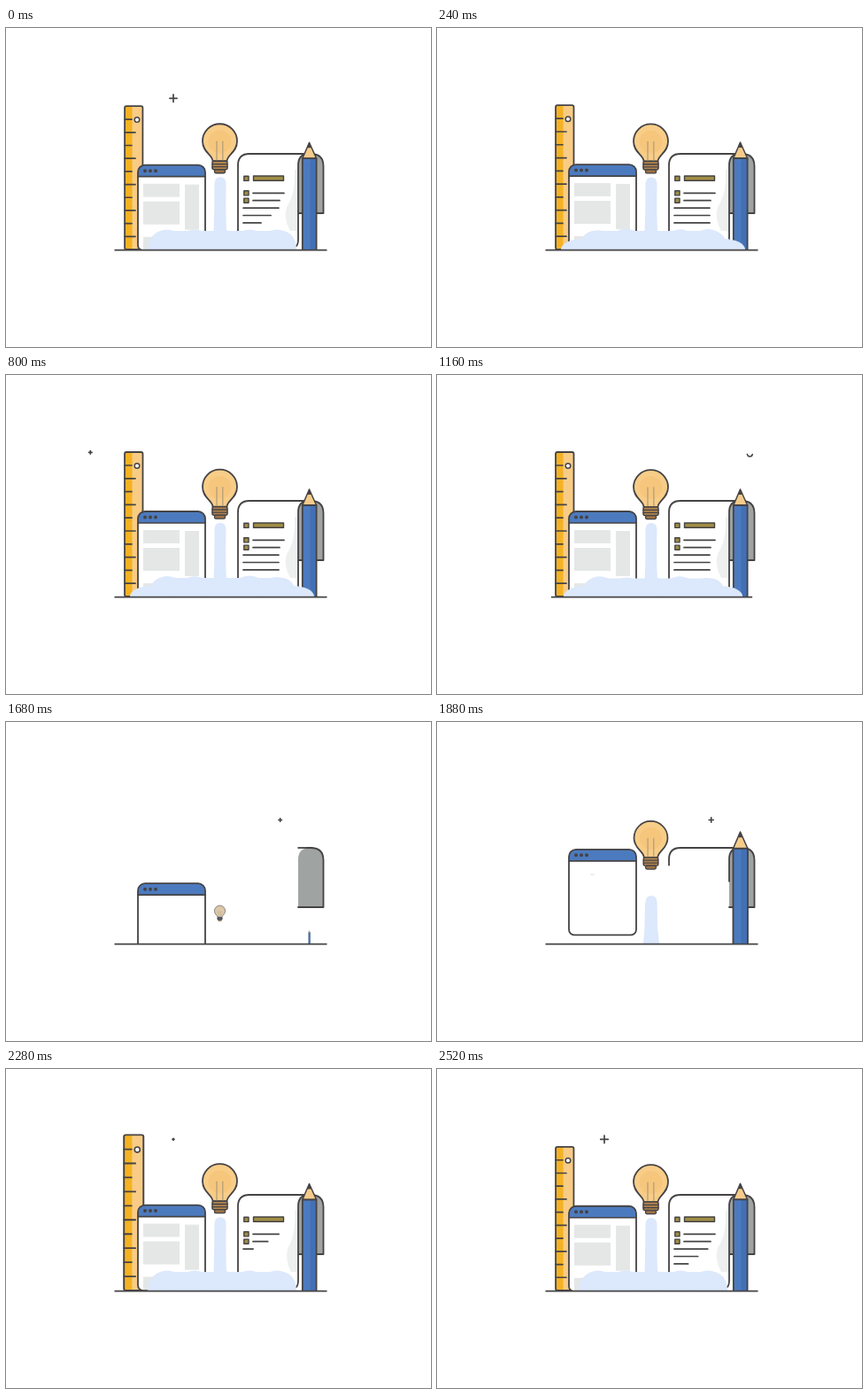
An HTML page with a canvas for the animation above (2560 ms loop, 480 by 360 pixels).

```html
<!DOCTYPE html>
<html lang="en">
<head>
<meta charset="utf-8">
<title>Idea launch</title>
<style>
html, body { margin: 0; width: 100%; height: 100%; overflow: hidden; background: #fff; }
canvas { display: block; width: 480px; height: 360px; }
</style>
</head>
<body>
<canvas id="stage" width="480" height="360"></canvas>
<script>
const g = document.getElementById('stage').getContext('2d');
const LOOP = 2560, STEP = 40, CUT = 1400, END = 3920, FLOOR = 250;
const INK = '#454344', BLUE = '#4c7abe', MIST = '#dce8fb', GREY = '#e4e7e6', OLIVE = '#a08e45';

// Timing rules
const clamp = x => Math.max(0, Math.min(1, x));
const mix = (a, b, k) => a + (b - a) * k;
const ramp = (t, start, length) => clamp((t - start) / length);
const ease = x => x * x * (3 - 2 * x);
const easeOut = x => 1 - (1 - x) ** 3;
const pulse = (t, start, length) => Math.sin(Math.PI * ramp(t, start, length));
const leave = (t, start = 3740) => 1 - ramp(t, start, END - start) ** 2;
const bob = t => -.45 + .95 * Math.cos((t - 2740) / 235);

// Damped swing from 0 to 1, with an overshoot.
function spring(t, start, speed) {
  const x = Math.max(0, t - start) / 1000 * speed;
  return 1 - Math.exp(-.82 * x) * Math.cos(x);
}

// Drawing helpers
function paint(path, fill, stroke, width = 1.8) {
  if (fill) { g.fillStyle = fill; g.fill(path); }
  if (stroke) { g.strokeStyle = stroke; g.lineWidth = width; g.stroke(path); }
}
const shape = (d, ...style) => paint(new Path2D(d), ...style);

function box(x, y, w, h, r, ...style) {
  const p = new Path2D();
  p.roundRect(x, y, w, h, r);
  paint(p, ...style);
}
function oval(x, y, rx, ry, ...style) {
  const p = new Path2D();
  p.ellipse(x, y, rx, ry, 0, 0, Math.PI * 2);
  paint(p, ...style);
}
function line(x1, y1, x2, y2, width = 1.7, color = INK) {
  if (x1 !== x2 || y1 !== y2) shape(`M${x1} ${y1}L${x2} ${y2}`, null, color, width);
}
function group(draw) { g.save(); draw(); g.restore(); }

function scaled(x, y, sx, sy, draw) {
  if (sx <= 0 || sy <= 0) return;
  group(() => {
    g.translate(x, y);
    g.scale(sx, sy);
    g.translate(-x, -y);
    draw();
  });
}
function clipped(x, y, w, h, draw) {
  group(() => {
    g.beginPath();
    g.rect(x, y, w, h);
    g.clip();
    draw();
  });
}
// A box that grows from its centre.
function growBox(x, y, w, h, k, ...style) {
  scaled(x + w / 2, y + h / 2, k, k, () => box(x, y, w, h, 0, ...style));
}
// Strokes the first part of a path of the given length.
function trace(d, length, part) {
  if (part <= 0) return;
  group(() => {
    g.lineCap = 'butt';
    g.setLineDash([length * part, length * 2]);
    shape(d, null, INK);
  });
}

// Objects
function ruler(t) {
  const s = spring(t, 1890, 8) * leave(t);
  scaled(144.5, FLOOR, s, s, () => {
    box(134, 87, 20.5, 163, 2, '#f8cc85');
    box(134, 87, 8.5, 163, 2, '#f4b223');
    box(134, 87, 20.5, 163, 2, null, INK);
    for (let i = 0; i < 10; i++) line(134, 102 + i * 14.8, i % 2 ? 146 : 142, 102 + i * 14.8);
    oval(148, 102.5, 2.8, 2.8, '#fff', INK, 1.5);
  });
}

function browser(t) {
  const dy = 108 * (1 - spring(t, 1520, 6) * leave(t));
  clipped(140, 60, 95, 191, () => {
    g.translate(0, dy);
    const frame = [149, 154, 76, 96.5, [8, 8, 6, 6]];
    box(...frame, '#fff');
    const blocks = [[155, 175, 41, 15], [155, 195, 41, 26], [155, 235, 41, 15], [202, 176, 16, 51]];
    blocks.forEach((b, i) => growBox(...b, ease(ramp(t, 1840 + 32 * i, 200)), GREY));
    box(149, 154, 76, 13, [8, 8, 0, 0], BLUE);
    line(149, 167, 225, 167);
    for (let i = 0; i < 3; i++) oval(157 + 6 * i, 160.5, 2, 2, INK);
    box(...frame, null, INK);
  });
}

function page(t) {
  const show = leave(t);
  scaled(344, 142, 1, ease(ramp(t, 1460, 180)) * show, () => {
    shape('M330 209V155Q330 142 344 142Q358.5 142 358.5 156V209Z', '#9fa3a2');
    shape('M340 142H344Q358.5 142 358.5 156V209H330', null, INK);
  });

  const shade = ramp(t, 2100, 200) * show;
  scaled(330, 190, shade, 1, () =>
    shape('M326 160H330V229H321Q313 215 317 202Q327 188 326 160Z', '#edf0ef'));
  trace('M346 142H275Q262 142 262 155V250', 190, ramp(t, 1640, 460) * show);
  trace('M342 142Q330 142 330 155V239Q330 246 326 247', 114, ramp(t, 1700, 450) * show);

  growBox(279.5, 167, 34, 5.2, ease(ramp(t, 1930, 260)) * show, OLIVE, INK, 1.4);
  for (let i = 0; i < 3; i++) {
    const y = i ? 177.9 + 8.4 * i : 169.8;
    growBox(268.8, y - 2.6, 5.2, 5.2, ease(ramp(t, 1900 + 40 * i, 240)) * show, OLIVE, INK, 1.4);
  }
  for (let i = 0; i < 5; i++) {
    const x = i < 2 ? 279 : 268, w = i < 2 ? 35 - 5 * i : 40, y = 186.3 + 8.4 * i;
    line(x, y, x + w * ramp(t, 1980 + 100 * i, 360) * show, y);
  }
}

function pencil(t) {
  const s = spring(t, 1662, 8) * leave(t);
  scaled(342.5, FLOOR, s, s, () => {
    box(334.8, 147, 15.8, 103.5, 0, BLUE);
    box(343.5, 147, 7, 103.5, 0, '#4370b5');
    shape('M334.8 147L342.5 129L350.6 147Z', '#f5cb8b', INK, 1.5);
    shape('M340 135L342.5 129L345 135Z', INK);
    shape('M334.8 250V147H350.6V250', null, INK);
  });
}

function jet(t) {
  const k = ease(ramp(t, 1760, 200)) * leave(t);
  if (k <= 0) return;
  const top = mix(FLOOR, 168 + bob(t), k), w = Math.sin(t / 90) * .8;
  shape(`M235.5 ${top + 7}Q236 ${top} 242 ${top}Q248 ${top} 248.5 ${top + 7}
    Q${248 + w} 205 249 232L251 250H233L234.5 232Q${235.5 - w} 205 235.5 ${top + 7}Z`, MIST);
}

function bulb(t) {
  const k = easeOut(ramp(t, 1640, 340)) * leave(t);
  const faded = k < .5;
  group(() => {
    g.translate(0, 90 * (1 - k * k) + bob(t));
    scaled(241.5, 135, k, k, () => {
      shape('M233.5 150C233.5 143 222 140 222 127.5A19.5 19.5 0 0 1 261 127.5C261 140 249.5 143 249.5 150Z',
        faded ? '#dcc7a8' : '#f8cd88', INK);
      if (!faded) oval(241.5, 128, 13, 13, '#f6c67d');
      for (const x of [238, 244.8]) line(x, 128, x, 149, 1.4, '#b8a27c');
      box(233, 150, 17, 9.5, 2, faded ? '#52607b' : '#b5854e', INK, 1.5);
      for (const y of [153.3, 156.4]) line(233, y, 250, y, 1.3);
      box(235.5, 159.5, 12, 4, 1.5, '#9a7146', INK, 1.3);
    });
  });
}

// A flat bank of steam with a lumpy top; a low puff spreads out at each end.
function steam(t) {
  const rise = ease(ramp(t, 2060, 220)) * leave(t, 3680);
  const spread = ease(ramp(t, 2560, 200));
  clipped(100, 200, 290, FLOOR - 200, () => scaled(244, FLOOR, rise, rise, () => {
    box(162, 229, 165, 40, 16, MIST);
    for (let i = 0; i < 5; i++) {
      const swell = 22.5 + spread * Math.sin(i * 2.4 + t / 500);
      oval(182 + 31 * i, FLOOR, 22, swell, MIST);
    }
    for (const side of [-1, 1]) oval(244 + side * 80, FLOOR, 24 * spread, 12 * spread, MIST);
  }));
}

function haze(t) {
  group(() => {
    g.globalAlpha = pulse(t, 1900, 280);
    box(228, 216, 102, 34, 0, '#f4f2ec');
  });
}

function plus(x, y, size) {
  const r = 4.3 * size;
  if (r <= 0.05) return;
  line(x - r, y, x + r, y);
  line(x, y - r, x, y + r);
}

function sparkles(t) {
  plus(309.7, 110.5, pulse(t, 1640, 300));
  plus(189, 79.3, pulse(t, 2240, 540));
  plus(95.3, 87.3, pulse(t, 3320, 300));
  const arc = pulse(t, 3480, 282);
  if (arc <= 0.01) return;
  const p = new Path2D();
  p.arc(353.3, 89, 3, Math.PI * (.5 - arc), Math.PI * (.5 + arc));
  paint(p, null, INK, 1.6);
}

function ground(t) {
  const half = 120 * ease(ramp(t, 1460, 180)) * leave(t, 3660);
  group(() => {
    g.lineCap = 'butt';
    line(242.5 - half, 250.6, 242.5 + half, 250.6, 1.6);
  });
}

const PARTS = [haze, ruler, browser, page, pencil, jet, steam, bulb, ground, sparkles];

function draw(time) {
  const t = time < CUT ? time + LOOP : time;
  g.fillStyle = '#fff';
  g.fillRect(0, 0, 480, 360);
  g.lineCap = g.lineJoin = 'round';
  for (const part of PARTS) part(t);
}

const start = performance.now();
function tick() {
  draw(Math.floor((performance.now() - start) % LOOP / STEP) * STEP);
  requestAnimationFrame(tick);
}
tick();
</script>
</body>
</html>
```
